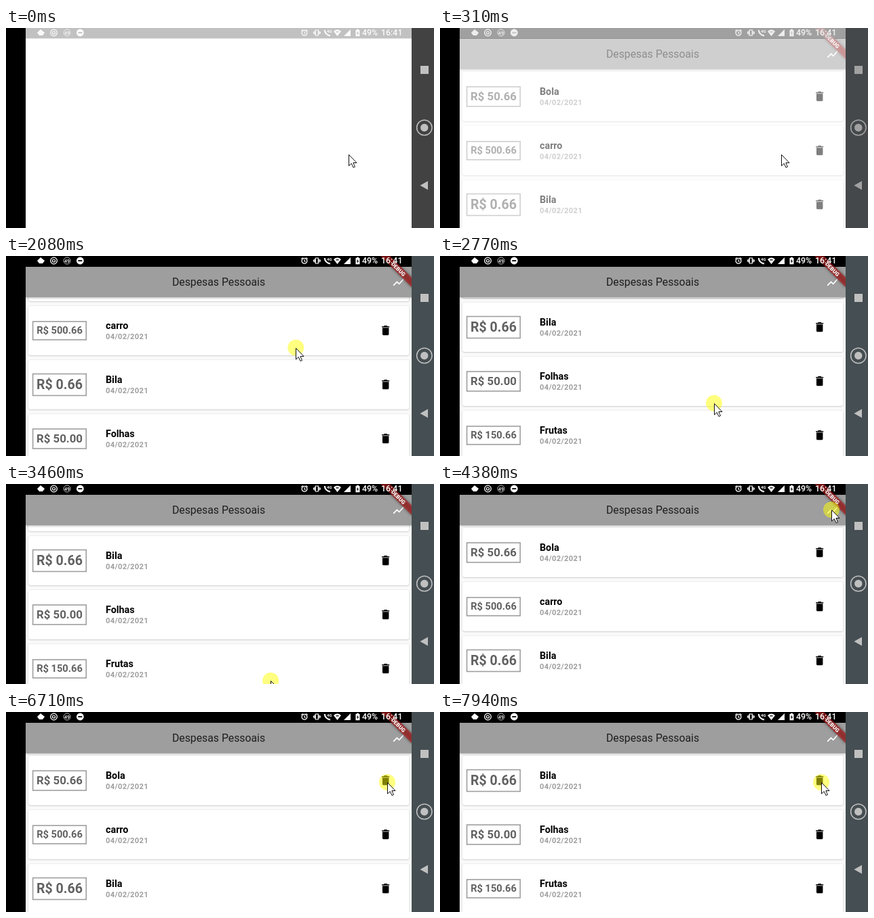
An HTML page with a canvas for the animation above (8 s loop, 631x296 px).

```html
<!DOCTYPE html>
<html lang="pt">
<head>
<meta charset="utf-8">
<title>Despesas Pessoais</title>
<style>
html, body { margin: 0; width: 100%; height: 100%; overflow: hidden; background: #000; }
canvas { display: block; }
</style>
</head>
<body>
<canvas id="stage" width="631" height="296"></canvas>
<script>
const c = document.getElementById('stage').getContext('2d');
const LOOP = 8000, UNIT = 0.79, GREY = '#9e9e9e';
const items = [['Bola', '50.66'], ['carro', '500.66'], ['Bila', '0.66'],
  ['Folhas', '50.00'], ['Frutas', '150.66'], ['Livro', '80.66']];

const icons = {
  trash: 'M6 19c0 1.1.9 2 2 2h8c1.1 0 2-.9 2-2V7H6v12zM19 4h-3.5l-1-1h-5l-1 1H5v2h14V4z',
  chart: 'M3.5 18.49l6-6.01 4 4L22 6.92l-1.41-1.41-7.09 7.97-4-4L2 16.99z',
  list: 'M3 13h2v-2H3zm0 4h2v-2H3zm0-8h2V7H3zm4 4h14v-2H7zm0 4h14v-2H7zM7 7v2h14V7z',
  arrow: 'M0 0V16.5L3.8 13L6.5 19L9 18L6.4 12H11.5Z'
};
for (const k in icons) icons[k] = new Path2D(icons[k]);

// Pointer gestures drive everything: a drag scrolls the list so that offset = grip - y
const drag = (start, end, x0, y0, x1, y1, grip) => ({ start, end, x0, y0, x1, y1, grip, down: true });
const tap = (start, end, x, y, action) => ({ ...drag(start, end, x, y, x, y), action });
const toggle = (start, end) => tap(start, end, 577, 39, 'toggle');
const remove = (start, end) => tap(start, end, 562, 105, 'remove');
const gestures = [
  { ...drag(0, 1000, 505, 188, 499, 189), down: false },
  drag(1690, 2230, 436, 207, 424, 110, 208),
  drag(2540, 3000, 408, 290, 400, 148, 375),
  drag(3170, 3480, 392, 200, 390, 298, 440),
  toggle(4300, 4690), toggle(5880, 6100),
  remove(6680, 6860), remove(7250, 7400), remove(7860, LOOP)
];

const mix = (a, b, u) => a + (b - a) * u;
const easeOut = u => 1 - (1 - u) ** 3;

function pose(g, u) {
  const y = mix(g.y0, g.y1, u);
  return { x: mix(g.x0, g.x1, u), y, offset: g.grip ? g.grip - y : 0 };
}

function stateAt(t) {
  const i = gestures.findLastIndex(g => g.start <= t), g = gestures[i];
  const done = gestures.filter(g => g.end <= t);
  const count = action => done.filter(g => g.action === action).length;
  const view = { down: g.down && t < g.end, chart: count('toggle') === 1, removed: count('remove') };
  if (t < g.end) return { ...view, ...pose(g, (t - g.start) / (g.end - g.start)) };
  const next = gestures[i + 1];
  const a = pose(g, 1), b = pose(next, 0), u = easeOut((t - g.end) / (next.start - g.end));
  return { ...view, x: mix(a.x, b.x, u), y: mix(a.y, b.y, u), offset: mix(a.offset, b.offset, u) };
}

function rect(x, y, w, h, color) {
  c.fillStyle = color;
  c.fillRect(x, y, w, h);
}

function disc(x, y, r, color) {
  c.beginPath();
  c.arc(x, y, r, 0, 7);
  c.fillStyle = color;
  c.fill();
}

function line(path, w, color) {
  c.lineWidth = w;
  c.strokeStyle = color;
  c.stroke(new Path2D(path));
}

function ring(x, y, r, w, color) {
  line(`M${x - r} ${y}a${r} ${r} 0 1 0 ${2 * r} 0a${r} ${r} 0 1 0 ${-2 * r} 0`, w, color);
}

function shape(path, color) {
  c.fillStyle = color;
  c.fill(new Path2D(path));
}

function text(s, x, y, size, color, weight = 400, align = 'left', gap = 0) {
  c.font = `${weight} ${size}px Roboto, sans-serif`;
  c.textAlign = align;
  c.letterSpacing = gap + 'px';
  c.fillStyle = color;
  c.fillText(s, x, y);
}

function icon(name, x, y, color) {
  c.save();
  c.translate(x - 12 * UNIT, y - 12 * UNIT);
  c.scale(UNIT, UNIT);
  c.fillStyle = color;
  c.fill(icons[name]);
  c.restore();
}

function raised(x, y, w, h, r, color, blur, dy, alpha) {
  c.save();
  c.shadowColor = `rgba(0,0,0,${alpha})`;
  c.shadowBlur = blur;
  c.shadowOffsetY = dy;
  c.beginPath();
  c.roundRect(x, y, w, h, r);
  c.fillStyle = color;
  c.fill();
  c.restore();
}

function row([name, price], y) {
  raised(33, y - 36.5, 561.5, 73, 3, '#fff', 2, 0.6, 0.28);
  const size = 68 / (1.748 + 0.577 * (price.length - 1));
  const h = Math.round(size * 1.17 + 9.4);
  c.lineWidth = 1.6;
  c.strokeStyle = GREY;
  c.strokeRect(39.6, y - h / 2, 78.6, h);
  text('R$ ' + price, 79, Math.round(y + size * 0.34), size, '#616161', 700, 'center');
  text(name, 147, y - 2.5, 14.3, '#000', 700);
  text('04/02/2021', 147, y + 12.5, 11.1, GREY, 700, 'left', 0.38);
  icon('trash', 559.7, y - 0.3, '#000');
}

function drawList(offset, removed) {
  items.slice(removed).forEach((item, i) => row(item, 101.5 + i * 80 - Math.round(offset)));
}

function drawChart() {
  raised(45, 77, 536.5, 157.5, 3, '#fff', 7, 2.5, 0.4);
  [...'FSSMTWT'].forEach((day, i) => {
    const x = 90.3 + i * 74.35, full = i === 6;
    text(full ? '833.30' : '0.00', x, 96.5, 12, '#212121', 400, 'center');
    text(day, x, 223.7, 12, '#212121', 400, 'center');
    c.beginPath();
    c.roundRect(x - 11, 106.5, 22, 98.5, 4.5);
    c.fillStyle = full ? '#616161' : '#dcdcdc';
    c.fill();
    c.lineWidth = 1;
    c.strokeStyle = full ? '#757575' : GREY;
    c.stroke();
  });
}

function drawBar(chart) {
  raised(29, 16, 569, 45, 0, GREY, 3, 1, 0.3);
  text('Despesas Pessoais', 313.5, 44, 15.8, '#1e1e1e', 400, 'center');
  icon(chart ? 'list' : 'chart', 578.5, 39, '#fff');
}

function drawBanner() {
  c.save();
  c.beginPath();
  c.rect(29, 0, 569, 296);
  c.clip();
  c.translate(598, 0);
  c.rotate(Math.PI / 4);
  c.filter = 'blur(2px)';
  rect(-33, 22.5, 66, 10, 'rgba(0,0,0,.5)');
  c.filter = 'none';
  rect(-33, 22.5, 66, 10, 'rgba(183,28,28,.63)');
  text('DEBUG', 0, 30.4, 8, '#fff', 900, 'center');
  c.restore();
}

function drawStatus(ink, hole) {
  // notifications
  shape('M46 7l5-5 6 5-3 4h-5z', ink);
  ring(70.5, 7, 4.8, 1.3, ink);
  ring(70.5, 7, 2, 1.2, ink);
  ring(90, 7, 5, 0.7, ink);
  text('49', 90, 9.7, 7, ink, 500, 'center');
  disc(109.3, 7, 5.4, ink);
  rect(106.3, 6.1, 6, 1.8, hole);
  // alarm, vibration, call
  ring(440, 7.3, 3.9, 1.3, ink);
  line('M440 5v3h2M435 4.4l3-2M445 4.4l-3-2', 1.1, ink);
  line('M456.3 3h4v8h-4zM453.5 5.5v3M455 4.5v5M461.8 4.5v5M463.3 5.5v3', 1.2, ink);
  line('M469.8 3q.7 7 8.2 8.3', 2.2, ink);
  text('4G', 473, 7, 6, ink, 700);
  // wifi, signal, battery
  shape('M488.5 12L483 5q5.5-4.8 11 0z', ink);
  rect(486.5, 5, 4, 1.4, hole);
  shape('M498 12h10V2z', ink);
  shape('M515.5 3h1.5v-1.2h3V3h1.5v9.3h-6z', ink);
  shape('M519 4.5l-2.2 3.5h1.4l-.4 3 2.4-3.8h-1.4z', hole);
  text('49%', 525, 11.4, 12.4, ink, 500);
  text('16:41', 553, 11.4, 12.4, ink, 500);
}

function drawNav(bg) {
  const ink = '#c0c0c0';
  rect(598, 0, 33, 296, bg);
  rect(611, 56, 12, 12, ink);
  ring(616.8, 147.5, 11.2, 1.5, ink);
  disc(616.8, 147.5, 5.7, ink);
  shape('M610.5 233l11.5-6.5v13z', ink);
}

function drawApp({ chart, offset, removed }) {
  rect(29, 0, 569, 296, '#fafafa');
  if (chart) drawChart(); else drawList(offset, removed);
  drawBar(chart);
  rect(29, 0, 569, 16, '#000');
  drawBanner();
  drawStatus('#fff', '#000');
  drawNav('#454e52');
}

function drawSplash() {
  rect(29, 0, 569, 296, '#fff');
  rect(29, 0, 569, 15.5, '#c1c1c1');
  drawStatus('#fafafa', '#c1c1c1');
  drawNav('#424242');
}

function drawPointer({ x, y, down }) {
  if (down) disc(x, y - 1, 12, 'rgba(255,255,0,.5)');
  c.save();
  c.translate(Math.round(x) + 0.5, Math.round(y) - 0.5);
  c.fillStyle = '#fff';
  c.fill(icons.arrow);
  c.lineWidth = 1;
  c.strokeStyle = '#111';
  c.stroke(icons.arrow);
  c.restore();
}

function draw(now) {
  const t = now % LOOP, state = stateAt(t);
  rect(0, 0, 631, 296, '#000');
  drawApp(state);
  c.globalAlpha = Math.max(0, Math.min(1, (540 - t) / 460));
  if (t < 540) drawSplash();
  c.globalAlpha = 1;
  drawPointer(state);
  requestAnimationFrame(draw);
}
requestAnimationFrame(draw);
</script>
</body>
</html>
```
